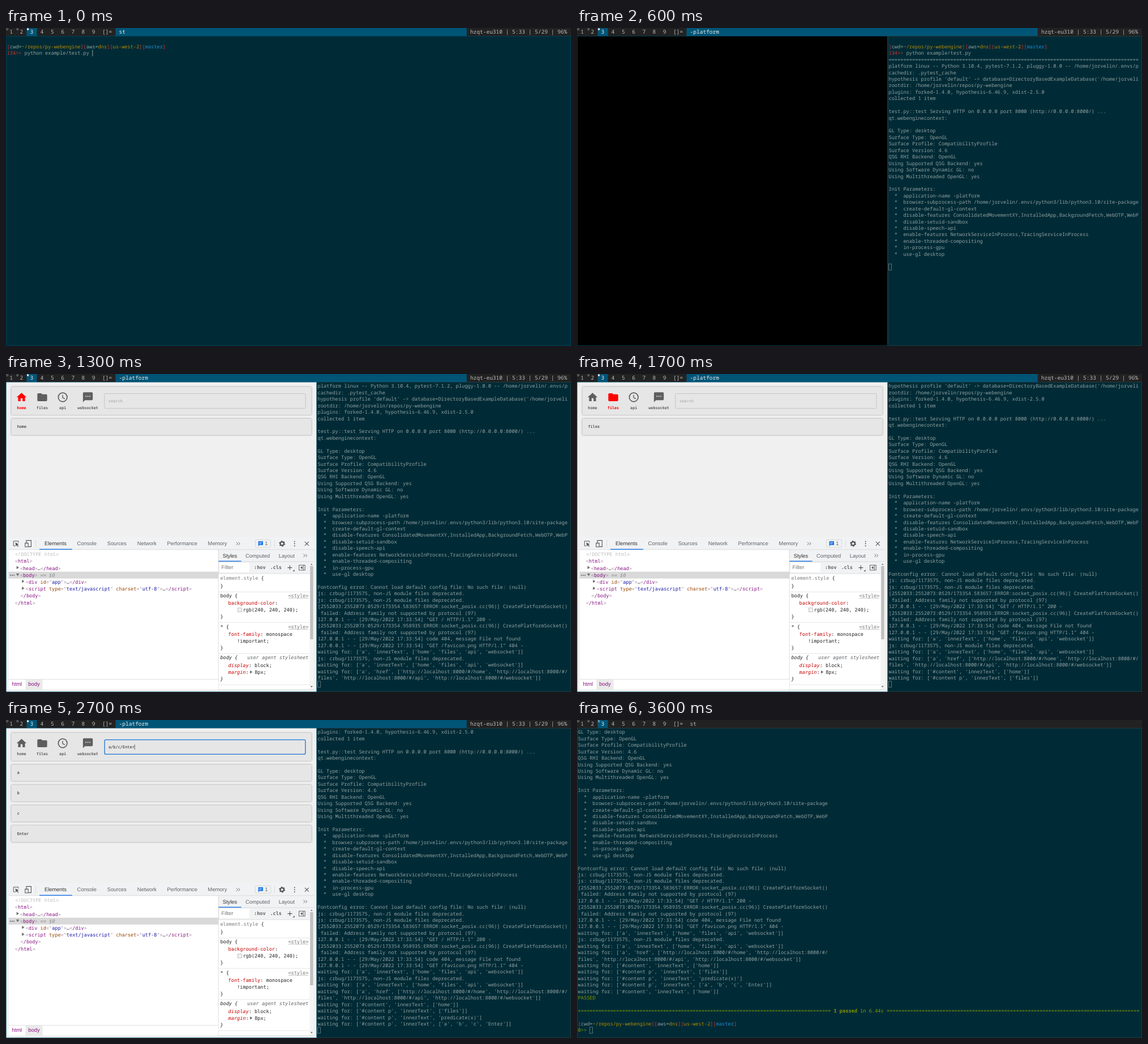
Animation of 998 by 561 pixels, one loop 4000 ms. Source, as an HTML page:

```html
<!DOCTYPE html>
<html lang="en">
<head>
<meta charset="utf-8">
<title>Browser test run</title>
<style>
html, body { margin: 0; width: 100%; height: 100%; overflow: hidden; background: #002b36; }
svg { display: block; width: 998px; height: 561px; }
text { white-space: pre; text-rendering: geometricPrecision; }
.term { font: 500 8.663px "Noto Sans Mono", monospace; }
.bar { font: 9.53px "Noto Sans Mono", monospace; }
.mono { font: 8.55px "DejaVu Sans Mono", monospace; }
.sans { font: 9.36px "Liberation Sans", Arial, sans-serif; }
.page { font: 6.76px "DejaVu Sans Mono", monospace; }
.field { font: 6.93px "DejaVu Sans Mono", monospace; }
.b { font-weight: 700; }
.i { font-style: italic; }
.card { filter: drop-shadow(0 .8px .9px rgba(0,0,0,.42)); }
</style>
</head>
<body>
<svg id="stage" viewBox="0 0 998 561" xmlns="http://www.w3.org/2000/svg"></svg>
<script>
const FG = '#93a1a1', RED = '#dc322f', GOLD = '#b58900', BLUE = '#268bd2', GREEN = '#859900';
const TEAL = '#005577', DARK = '#222222', GREY = '#5f6368', TAG = '#881280', PALE = '#a894a6';
const COL = 5.198, ROW = 11.435, TOP = 15.6, SPLIT = 548.9, NARROW = 85, ROWS = 46;
const HOME = '/home/jorvelin', HOST = 'hzqt-eu310';

const esc = s => s.replace(/&/g, '&amp;').replace(/</g, '&lt;');
const rect = (x, y, w, h, fill, more = '') =>
  `<rect x="${x}" y="${y}" width="${w}" height="${h}" fill="${fill}" ${more}/>`;
const path = (d, fill, more = '') => `<path d="${d}" fill="${fill}" ${more}/>`;
const line = (d, color, w = 1) => path(d, 'none', `stroke="${color}" stroke-width="${w}"`);
// A run of text: a plain string, or a list of [colour, string, class].
const text = (cls, x, y, runs, fill = '#222') => {
  const body = typeof runs === 'string' ? esc(runs)
    : runs.map(([c, s, k = '']) => `<tspan fill="${c}" class="${k}">${esc(s)}</tspan>`).join('');
  return `<text class="${cls}" x="${x}" y="${y}" fill="${fill}">${body}</text>`;
};

// ---- terminal ----
const prompt = [[RED, '['], [FG, 'cwd='], [GOLD, '~/repos/py-webengine'], [RED, ']['], [FG, 'aws='],
  [GOLD, 'dns'], [RED, ']['], [GOLD, 'us-west-2'], [RED, ']['], [BLUE, 'master'], [RED, ']']];
const eq = n => '='.repeat(n);
const early = `platform linux -- Python 3.10.4, pytest-7.1.2, pluggy-1.0.0 -- ${HOME}/.envs/python3/bin/python3
cachedir: .pytest_cache
hypothesis profile 'default' -> database=DirectoryBasedExampleDatabase('${HOME}/repos/py-webengine/.hypothesis/examples')
rootdir: ${HOME}/repos/py-webengine
plugins: forked-1.4.0, hypothesis-6.46.9, xdist-2.5.0
collected 1 item

test.py::test Serving HTTP on 0.0.0.0 port 8000 (http://0.0.0.0:8000/) ...
qt.webenginecontext:

GL Type: desktop
Surface Type: OpenGL
Surface Profile: CompatibilityProfile
Surface Version: 4.6
QSG RHI Backend: OpenGL
Using Supported QSG Backend: yes
Using Software Dynamic GL: no
Using Multithreaded OpenGL: yes

Init Parameters:
  *  application-name -platform
  *  browser-subprocess-path ${HOME}/.envs/python3/lib/python3.10/site-packages/PyQt6/Qt6/libexec/QtWebEngineProcess
  *  create-default-gl-context
  *  disable-features ConsolidatedMovementXY,InstalledApp,BackgroundFetch,WebOTP,WebPayments,WebUSB,PictureInPicture
  *  disable-setuid-sandbox
  *  disable-speech-api
  *  enable-features NetworkServiceInProcess,TracingServiceInProcess
  *  enable-threaded-compositing
  *  in-process-gpu
  *  use-gl desktop
`.split('\n');
const js = 'js: crbug/1173575, non-JS module files deprecated.';
const socketError = n => [`[2552033:2552073:0529/173354.${n}:ERROR:socket_posix.cc(96)] CreatePlatformSocket()`,
  ' failed: Address family not supported by protocol (97)'];
const served = s => `127.0.0.1 - - [29/May/2022 17:33:54] ${s} -`;
const wait = s => `waiting for: [${s}]`;
const links = wait("'a', 'innerText', ['home', 'files', 'api', 'websocket']");
const home = wait("'#content', 'innerText', ['home']");
const log = [
  '', prompt, [[RED, '134>>'], [FG, ' python example/test.py ']],
  eq(85) + ' test session starts ' + eq(85),
  ...early,
  'Fontconfig error: Cannot load default config file: No such file: (null)', js, js,
  ...socketError(583657), served('"GET / HTTP/1.1" 200'),
  ...socketError(958935), '127.0.0.1 - - [29/May/2022 17:33:54] code 404, message File not found',
  served('"GET /favicon.png HTTP/1.1" 404'), links, js, links,
  "waiting for: ['a', 'href', ['http://localhost:8000/#/home', 'http://localhost:8000/#/",
  "files', 'http://localhost:8000/#/api', 'http://localhost:8000/#/websocket']]",
  home, wait("'#content p', 'innerText', ['files']"), wait("'#content p', 'innerText', 'predicate(x)'"),
  wait("'#content p', 'innerText', ['a', 'b', 'c', 'Enter']"), home,
  [[GREEN, 'PASSED']], '',
  [[GREEN, eq(86) + ' '], [GREEN, '1 passed', 'b'], [GREEN, ' in 6.44s ' + eq(86)]],
  '', prompt, [[GREEN, '0>>'], [FG, ' ']]
];

function terminal({ n, col = 0, split, cut, idle }) {
  const left = split ? SPLIT : 0, x = left + 1.56;
  const first = Math.max(0, n - ROWS);
  let out = rect(left, 14, 998 - left, 547, '#002b36');
  log.slice(first, n + (col ? 1 : 0)).forEach((s, i) => {
    if (cut && typeof s === 'string') s = s.slice(0, NARROW);
    if (s.length) out += text('term', x, TOP + i * ROW + 8.8, s, FG);
  });
  const cx = x + col * COL, cy = TOP + (n - first) * ROW;
  out += split || idle
    ? rect(cx + .25, cy + .25, COL - .5, ROW - .5, 'none', `stroke="${FG}" stroke-width=".6"`)
    : rect(cx, cy, 1, ROW, FG);
  return out + rect(left + .26, 14.26, 997.5 - left, 546.4, 'none',
    `stroke="${split || idle ? '#444' : TEAL}" stroke-width=".52"`);
}

// ---- status bar ----
function bar({ split, idle }) {
  let out = rect(0, 0, 998, 14, DARK) + rect(36.4, 0, 18.2, 14, TEAL);
  for (let i = 0; i < 9; i++) {
    const on = i === 2, x = i * 18.2;
    out += text('bar', x + 6.2, 10.3, String(i + 1), on ? '#eee' : '#bbb');
    if (i < 3) out += rect(x + .9, .9, 2.6, 2.6, on && !idle ? '#eee' : 'none',
      `stroke="${on ? '#eee' : '#bbb'}" stroke-width=".55"`);
  }
  out += text('bar', 170, 10.3, '[]=', '#bbb');
  if (!idle) out += rect(193.4, 0, 620.4, 14, TEAL) +
    text('bar', 819.9, 10.3, HOST + ' | 5:33 | 5/29 | 96%', '#bbb');
  return out + text('bar', 199.6, 10.3, split ? '-platform' : 'st', idle ? '#bbb' : '#eee');
}

// ---- web page ----
const clock = c => `<circle cx="12" cy="12" r="9" fill="none" stroke="${c}" stroke-width="2"/>` +
  line('M11.8 7v5.6l4.6 2.7', c, 1.6);
const menu = [
  ['home', 27.5, c => path('M10 20v-6h4v6h5v-8h3L12 3 2 12h3v8z', c)],
  ['files', 64, c => path('M10 4H4Q2 4 2 6V18Q2 20 4 20H20Q22 20 22 18V8Q22 6 20 6H12z', c)],
  ['api', 100.2, clock],
  ['websocket', 144.6, c => path('M20 2H4Q2 2 2 4V22l4-4H20Q22 18 22 16V4Q22 2 20 2zM9 11H7V9h2zM13 11h-2V9h2zM17 11h-2V9h2z', c, 'fill-rule="evenodd"')]
];
const card = (y, h) => rect(9.3, y, 530.4, h, '#e6e6e6', 'rx="1.6" class="card"');

function page({ active, cards, typed }) {
  let out = card(22.5, 49.6);
  for (const [name, cx, icon] of menu) {
    const c = name === active ? '#ff0000' : '#5e5e5e';
    out += `<g transform="translate(${cx - 10.4} 30.6) scale(.866)">${icon(c)}</g>` +
      text('page b', cx - name.length * 2.035, 61.7, name, c);
  }
  const focus = typed !== undefined;
  out += focus ? rect(174.2, 34.8, 354.6, 25.6, 'none', 'rx="2" stroke="#1976d2" stroke-width="1.3"')
    : rect(173.9, 34.5, 355.2, 26.2, 'none', 'rx="2" stroke="#bcbcbc" stroke-width=".8"');
  out += text('field', 181, 50.2, focus ? typed : 'search', focus ? '#222' : '#a2a2a2');
  if (focus) out += rect(181 + typed.length * 4.172, 43.2, .6, 9.2, '#111');
  cards.forEach((s, i) => {
    out += card(78.4 + i * 35.9, 29.4) + text('page', 19.7, 95.1 + i * 35.9, s, '#111');
  });
  return out;
}

// ---- developer tools ----
const tabs = (y, list) => list.map(([x, s], i) => text('sans', x, y, s, i ? GREY : '#333')).join('');
const tag = s => [[PALE, '<'], [TAG, s], [PALE, '>']];
const pair = s => [...tag(s), ['#555', '…'], ...tag('/' + s)];
const right = (x, y) => path(`M${x} ${y}v5.6l4.4-2.8z`, '#6e6e6e');

function tree() {
  const attr = (k, v) => [['#994500', ' ' + k], [PALE, '="'], ['#1a1aa6', v], [PALE, '"']];
  const rows = [
    [16.2, [['#c0c0c0', '<!DOCTYPE html>']]],
    [15.8, tag('html')],
    [24.8, pair('head')],
    [24.8, [...tag('body'), ['#8a8a8a', ' == $0', 'i']]],
    [34.8, [[PALE, '<'], [TAG, 'div'], ...attr('id', 'app'), [PALE, '>'], ['#555', '…'], ...tag('/div')]],
    [34.8, [[PALE, '<'], [TAG, 'script'], ...attr('type', 'text/javascript'), ...attr('charset', 'utf-8'),
      [PALE, '>'], ['#555', '…'], ...tag('/script')]],
    [25.6, tag('/body')],
    [15.8, tag('/html')]
  ];
  let out = rect(4.7, 348.7, 370.3, 12.1, '#d9d9d9');
  rows.forEach(([x, runs], i) => out += text('mono', x, 321.1 + i * 12.23, runs));
  for (const x of [8, 11, 14]) out += `<circle cx="${x}" cy="355" r=".9" fill="#555"/>`;
  out += right(18.6, 338.6) + right(28.2, 363) + right(28.2, 375.3) + path('M17.8 352h5.6l-2.8 4.4z', '#6e6e6e');
  return out + rect(4.7, 538.6, 370.3, 18.2, '#fff') + line('M4.7 538.6H375', '#ccc', .6) +
    rect(34.5, 538.9, 30, 17.9, '#eaeaea') +
    text('sans', 10.5, 550.3, 'html', TAG) + text('sans', 39.3, 550.3, 'body', TAG);
}

function styles() {
  const at = (x, y, runs, cls = '') => text('mono ' + cls, x, y + 3, runs);
  const prop = (k, v = '') => [['#c80000', k], ['#222', ':' + v]];
  const origin = y => at(498.4, y, [['#777', '<style>']]) + line(`M498.6 ${y + 4.4}H534.2`, '#888', .5);
  let out = at(378.4, 360.4, [['#777', 'element.style '], ['#222', '{']]) + at(378.4, 373.8, '}') +
    at(378.4, 391, 'body {') + origin(391) + at(392.6, 404.4, prop('background-color')) +
    rect(409.3, 412.8, 7, 7, '#f0f0f0', 'stroke="#a0a0a0" stroke-width=".6"') +
    at(418.4, 416.4, 'rgb(240, 240, 240);') + at(378.4, 428.4, '}') +
    at(378.4, 446, '* {') + origin(446) + at(392.6, 459.4, prop('font-family', ' monospace')) +
    at(408.2, 471.4, '!important;') + at(378.4, 483.4, '}') +
    at(378.4, 500.4, 'body {', 'i') + at(426.2, 500.4, [[GREY, 'user agent stylesheet']], 'i') +
    at(392.6, 513.6, [['#c80000', 'display', 'i'], ['#222', ': block;']]) +
    at(392.6, 525.8, [['#c80000', 'margin', 'i'], ['#222', ':']]) + right(431, 523) +
    at(439.2, 525.8, '8px;') + at(378.4, 538, '}', 'i');
  for (const y of [384.4, 438.2, 493.2, 548]) out += line(`M375.5 ${y}H536.4`, '#d4d4d4', .6);
  return out;
}

function devtools(full) {
  let out = rect(4.7, 288, 539, 22, '#f1f2f3') + rect(4.7, 310, 370.3, 246.8, '#fff') +
    rect(375, 310, 168.7, 42, '#f1f2f3') + rect(375, 352, 161.6, 204.8, '#fff') +
    rect(536.6, 331, 7.1, 225.8, '#f4f4f4') +
    line('M4.7 309.8H543.7M375.2 310V556.8M375 331H543.7M375 352.2H536.6M4.7 556.8H543.7', '#cacaca', .6) +
    line('M52.6 293V305.5M474.3 293V305.5', '#ccc', .6);
  // toolbar
  out += line('M21.8 297.5V294.8H13.3V303.2H16.4', '#555', 1) + path('M16.6 297.2l6.2 3.2-2.6.7 2 2.8-1.1.9-2.1-2.9-1.6 2z', '#555') +
    line('M36 299V293.6H44.4V304.6H40M33.8 298.4H39.2V305H33.8z', '#555', 1.1);
  out += tabs(302.4, [[68, 'Elements'], [125.6, 'Console'], [178.7, 'Sources'], [231.7, 'Network'],
    [284.5, 'Performance'], [356.6, 'Memory']]) + rect(59, 308.6, 57.8, 1.4, '#1a73e8');
  const more = (x, y) => line(`M${x} ${y - 2.6}l2.6 2.6-2.6 2.6m3.7-5.2l2.6 2.6-2.6 2.6`, '#5f6368', .95);
  out += more(406.8, 299.3) + more(525.4, 320.3);
  out += rect(440.4, 292.4, 27.2, 13.4, '#f1f2f3', 'rx="1.6" stroke="#cfcfcf" stroke-width=".7"') +
    path('M445.6 295h8.4v6.8h-6.4l-2 2z', '#1a73e8') + line('M447.2 297.3H452.4M447.2 299.4H451', '#fff', .7) +
    text('sans', 457.2, 302.4, '1', GREY);
  out += `<circle cx="487.6" cy="299.3" r="3.1" fill="none" stroke="#555" stroke-width="2.2"/>` +
    `<circle cx="487.6" cy="299.3" r="4.6" fill="none" stroke="#555" stroke-width="1.6" stroke-dasharray="2.4 2.417"/>`;
  for (const y of [295.4, 299.3, 303.2]) out += `<circle cx="509.7" cy="${y}" r="1" fill="#555"/>`;
  out += line('M527.8 295.8l7 7m0-7l-7 7', '#555', 1.1);
  // sidebar
  out += tabs(323.5, [[382.7, 'Styles'], [423, 'Computed'], [481.7, 'Layout']]) + rect(375.4, 329.6, 40.2, 1.4, '#1a73e8');
  const dx = full ? 0 : 22, c = full ? '#555' : '#aaa';
  out += rect(377, 333, 53 + dx, 16.6, '#fff') + text('sans', 380.6, 344.1, 'Filter', '#757575') +
    text('mono b', 438 + dx, 344.4, ':hov', GREY) + text('mono b', 466.4 + dx, 344.4, '.cls', GREY) +
    line(`M${497.4 + dx} 341.6h8m-4-4v8`, c, 1.1) + path(`M${509.6 + dx} 345v3.2h-3.2z`, c);
  if (full) out += rect(517.6, 337.2, 10.6, 8.8, 'none', 'stroke="#555" stroke-width=".9"') +
    path('M523.6 339v5.2l-3.6-2.6z', '#555') + line('M525.4 337V346', '#555', .8) +
    rect(537.2, 338.8, 5.4, 129.2, '#c1c1c1');
  out += path('M537.9 336.6h3.8l-1.9-2.2z', full ? '#555' : '#999') + path('M537.9 550.6h3.8l-1.9 2.2z', '#555');
  return out + (full ? tree() + styles() : line('M4.7 544.6H375', '#ccc', .6));
}

function browser(s) {
  let out = rect(0, 14, SPLIT, 547, s.view === 'black' ? '#000' : '#f0f0f0');
  if (s.cards) out += page(s);
  if (s.tools) out += devtools(s.tools === 'full');
  return out + rect(.26, 14.26, SPLIT - .6, 546.4, 'none', `stroke="${TEAL}" stroke-width=".7"`);
}

// ---- timeline: each step changes part of the state ----
const steps = [
  [0, { n: 2, col: 29 }],
  [100, { n: 3, col: 0 }],
  [200, { n: 10 }],
  [300, { n: 11 }],
  [400, { n: 35 }],
  [600, { split: true, cut: true, view: 'black' }],
  [700, { n: 36 }],
  [800, { n: 38, view: 'page' }],
  [900, { n: 41, active: 'home', cards: ['home'], tools: 'empty' }],
  [1000, { n: 46 }],
  [1100, { n: 48 }],
  [1200, { tools: 'full' }],
  [1300, { n: 50 }],
  [1400, { n: 51 }],
  [1700, { n: 52, active: 'files', cards: ['files'] }],
  [2100, { n: 53, active: 'websocket', cards: ['time: 2022-05-30T03:33:51Z'] }],
  [2400, { typed: 'a/' }],
  [2500, { typed: 'a/b/c' }],
  [2600, { typed: 'a/b/c/Enter' }],
  [2700, { n: 54, active: '', cards: ['a', 'b', 'c', 'Enter'] }],
  [3000, { n: 55, active: 'home', cards: ['home'], typed: undefined }],
  [3100, { n: 56 }],
  [3200, { n: 59, split: false }],
  [3300, { n: 60, col: 4 }],
  [3600, { idle: true }]
];
let state = {};
const scenes = steps.map(([at, change]) => ({ at, state: state = { ...state, ...change } }));

const stage = document.getElementById('stage'), start = performance.now();
let shown;
function tick() {
  const t = (performance.now() - start) % 4000;
  const scene = scenes.filter(s => s.at <= t).pop();
  if (scene !== shown) {
    shown = scene;
    const s = scene.state;
    stage.innerHTML = terminal(s) + (s.split ? browser(s) : '') + bar(s);
  }
  requestAnimationFrame(tick);
}
tick();
</script>
</body>
</html>
```
